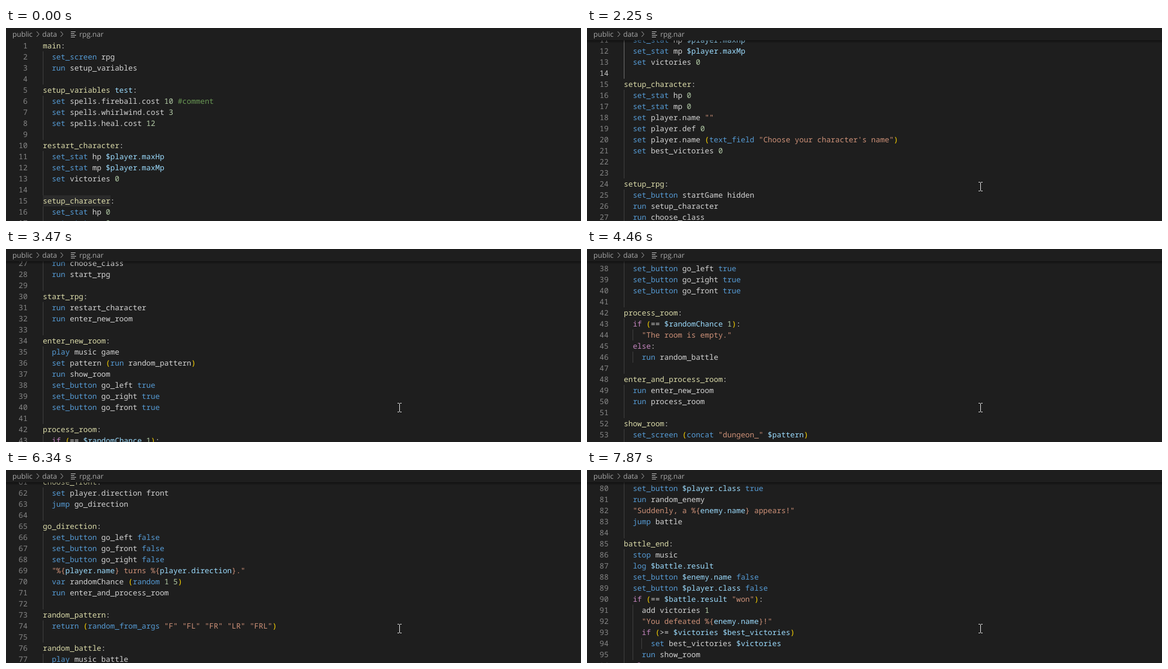
Recreate the animation shown at these times as an HTML page. Size 984 by 331 pixels, loop 7.99 s.

```html
<!DOCTYPE html>
<html lang="en">
<head>
<meta charset="utf-8">
<title>rpg.nar</title>
<style>
html, body { margin: 0; width: 100%; height: 100%; overflow: hidden; background: #1e1e1e; }
#stage { position: relative; width: 984px; height: 331px; overflow: hidden; background: #1e1e1e; }
#crumbs { position: absolute; inset: 0 0 auto; height: 21px; color: #a9a9a9;
  font: 12.2px/21px "Open Sans", "Noto Sans", sans-serif; text-rendering: geometricPrecision; }
#crumbs span { position: absolute; top: 0; white-space: pre; }
#crumbs svg { position: absolute; left: 0; top: 0; fill: none; stroke: #a9a9a9; }
#view { position: absolute; left: 0; top: 21px; width: 984px; height: 310px; overflow: hidden; }
#shade { position: absolute; left: 0; top: 0; width: 984px; height: 5px;
  background: linear-gradient(rgba(0, 0, 0, .45), transparent); }
#code { position: absolute; left: 0; top: 0; width: 984px; color: #d4d4d4;
  font: 12.83px/19px "Noto Sans Mono", "DejaVu Sans Mono", monospace;
  text-rendering: geometricPrecision; font-variant-ligatures: none; }
.row { position: relative; height: 19px; white-space: pre; }
.num { position: absolute; left: 0; width: 37px; text-align: right; color: #858585; }
.txt { position: absolute; left: 63px; }
.guide { position: absolute; top: 0; width: 1px; height: 19px; background: #404040; }
.on .num { color: #c6c6c6; }
.lit .guide { background: #707070; }
.label { color: #dcdcaa; } .cmd { color: #569cd6; } .flow { color: #c586c0; }
.var { color: #9cdcfe; } .int { color: #b5cea8; } .str { color: #ce9178; }
.par { color: #ffd700; } .note { color: #6a9955; }
#mark { position: absolute; left: 63px; top: 266px; width: 116px; height: 19px; background: #2a2a2a; }
#caret { position: absolute; left: 63px; top: 247px; width: 2px; height: 19px; background: #aeafad; }
#beam { position: absolute; left: -4px; top: -9px; fill: none; stroke: #e8e8e8; }
</style>
</head>
<body>
<div id="stage">
  <div id="crumbs">
    <span style="left:11px">public</span>
    <span style="left:62px">data</span>
    <span style="left:125.5px">rpg.nar</span>
    <svg width="180" height="21">
      <path d="M52.5 6l4 4.5-4 4.5M93.5 6l4 4.5-4 4.5"/>
      <path d="M111 6.5h8M111 9.5h6M111 12.5h9M111 15.5h7" stroke="#c5c5c5"/>
    </svg>
  </div>
  <div id="view">
    <div id="code"><div id="mark"></div></div>
    <div id="shade"></div>
  </div>
  <svg id="beam" width="9" height="18"><path d="M1 1.5h2.5l1 1 1-1H8M4.5 2v14M1 16.5h2.5l1-1 1 1H8"/></svg>
</div>
<script>
const source = `main:
  set_screen rpg
  run setup_variables

setup_variables test:
  set spells.fireball.cost 10 #comment
  set spells.whirlwind.cost 3
  set spells.heal.cost 12

restart_character:
  set_stat hp $player.maxHp
  set_stat mp $player.maxMp
  set victories 0

setup_character:
  set_stat hp 0
  set_stat mp 0
  set player.name ""
  set player.def 0
  set player.name (text_field "Choose your character's name")
  set best_victories 0


setup_rpg:
  set_button startGame hidden
  run setup_character
  run choose_class
  run start_rpg

start_rpg:
  run restart_character
  run enter_new_room

enter_new_room:
  play music game
  set pattern (run random_pattern)
  run show_room
  set_button go_left true
  set_button go_right true
  set_button go_front true

process_room:
  if (== $randomChance 1):
    "The room is empty."
  else:
    run random_battle

enter_and_process_room:
  run enter_new_room
  run process_room

show_room:
  set_screen (concat "dungeon_" $pattern)

choose_left:
  set player.direction left
  jump go_direction
choose_right:
  set player.direction right
  jump go_direction
choose_front:
  set player.direction front
  jump go_direction

go_direction:
  set_button go_left false
  set_button go_front false
  set_button go_right false
  "%{player.name} turns %{player.direction}."
  var randomChance (random 1 5)
  run enter_and_process_room

random_pattern:
  return (random_from_args "F" "FL" "FR" "LR" "FRL")

random_battle:
  play music battle
  set_screen battle
  set_button $enemy.name true
  set_button $player.class true
  run random_enemy
  "Suddenly, a %{enemy.name} appears!"
  jump battle

battle_end:
  stop music
  log $battle.result
  set_button $enemy.name false
  set_button $player.class false
  if (== $battle.result "won"):
    add victories 1
    "You defeated %{enemy.name}!"
    if (>= $victories $best_victories)
      set best_victories $victories
    run show_room
  else:
    set best_victories 0`;

const LOOP = 7990, COL = 7.697, CLICK = 660, BLINK = 530;

// [time, scroll offset]
const scrolls = [
  [0, 0], [1390, 50], [1660, 100], [1930, 150], [2200, 200], [2330, 250],
  [2610, 300], [3010, 400], [3270, 450], [3470, 500], [3800, 550], [3870, 600],
  [4060, 650], [4460, 700], [4530, 750], [4730, 800], [5070, 900], [5120, 950],
  [5320, 1000], [5740, 1050], [5870, 1100], [6340, 1150], [6480, 1200],
  [6940, 1250], [7200, 1300], [7280, 1350], [7680, 1400], [7750, 1450], [7870, 1500]
];
// [time, share of the pointer's path]
const moves = [[320, 0], [390, .3], [460, .6], [520, .85], [590, 1]];

const $ = id => document.getElementById(id);
const make = (cls, parent, text = '') => {
  const el = document.createElement(cls === 'row' ? 'div' : 'span');
  el.className = cls;
  el.textContent = text;
  parent.append(el);
  return el;
};

const kinds = /(#.*)|("[^"]*")|([()])|(\$[\w.]+)|(\b\d+\b)|([\w.]+)|([^\w"$()#]+)/g;

function word(text, before) {
  if (/^(if|else)$/.test(text)) return 'flow';
  if (/^(true|false)$/.test(text)) return 'cmd';
  if (before === '') return 'label';
  if (/^ +$|\($/.test(before) && text !== 'add') return 'cmd';
  return /^\S/.test(before) ? 'var' : '';
}

function paint(line, box) {
  for (const m of line.matchAll(kinds)) {
    const [all, note, str, par, ref, int, name] = m;
    if (str) {
      for (const part of str.split(/(?<=%\{)([\w.]+)(?=\})/))
        make(/^[\w.]+$/.test(part) ? 'var' : 'str', box, part);
      continue;
    }
    make(note ? 'note' : par ? 'par' : ref ? 'var' : int ? 'int'
      : name ? word(name, line.slice(0, m.index)) : '', box, all);
  }
}

const rows = source.split('\n').map((line, i) => {
  const row = make('row', $('code'));
  const depth = line ? line.search(/\S/) / 2 : 1;
  make('num', row, i + 1);
  for (let d = 0; d < depth; d++)
    make('guide', row).style.left = Math.floor(63 + d * 2 * COL) + 'px';
  paint(line, make('txt', row));
  return row;
});
const caret = make('', $('code'));
caret.id = 'caret';

const at = (steps, t) => steps.reduce((v, [time, value]) => t >= time ? value : v, 0);
const show = (el, on) => el.style.visibility = on ? 'visible' : 'hidden';

function draw(t) {
  const top = at(scrolls, t), k = at(moves, t), clicked = t >= CLICK;
  $('code').style.transform = `translateY(${-top}px)`;
  $('beam').style.transform = `translate(${706 - 33 * k}px, ${220 + 52 * k}px)`;
  show($('beam'), t >= moves[0][0]);
  show($('shade'), top > 0);
  show($('mark'), t < 720);
  show(caret, clicked && Math.floor((t - CLICK) / BLINK) % 2 === 0);
  rows[13].classList.toggle('on', clicked);
  for (let i = 10; i < 14; i++) rows[i].classList.toggle('lit', clicked);
}

const start = performance.now();
function tick() {
  draw((performance.now() - start) % LOOP);
  requestAnimationFrame(tick);
}
tick();
</script>
</body>
</html>
```
